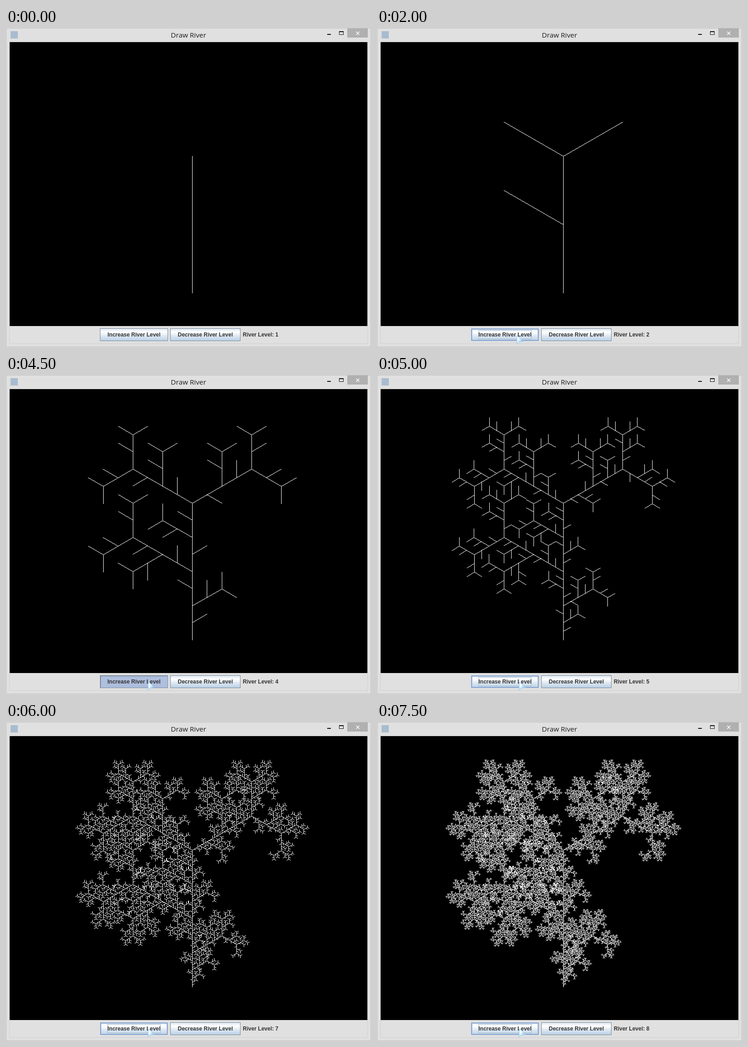
An HTML page with a canvas for the animation above (8000 ms loop, 800 px wide and 700 px high).

```html
<!DOCTYPE html>
<html lang="en">
<head>
<meta charset="utf-8">
<title>Draw River</title>
<style>
  html, body { margin: 0; width: 100%; height: 100%; overflow: hidden; background: #e0e0e0; }
  canvas { position: absolute; left: 8px; top: 31px; background: #000; }
  svg { position: absolute; left: 0; top: 0; }
  .label { font: bold 12px "Liberation Sans", Arial, sans-serif; fill: #333; }
  .title { font: 15.3px "Open Sans", "Noto Sans", sans-serif; fill: #1c1c1c; text-anchor: middle; }
  .line { fill: none; }
</style>
</head>
<body>
<canvas id="view" width="784" height="623"></canvas>
<svg width="800" height="700" viewBox="0 0 800 700">
  <defs>
    <linearGradient id="metal" x2="0" y2="1">
      <stop offset="0" stop-color="#dde8f3"/>
      <stop offset=".3" stop-color="#fff"/>
      <stop offset=".6" stop-color="#dde8f3"/>
      <stop offset="1" stop-color="#b8cfe5"/>
    </linearGradient>
    <linearGradient id="glass" x2="1" y2="1">
      <stop offset=".3" stop-color="#fff"/>
      <stop offset="1" stop-color="#58aee8"/>
    </linearGradient>
  </defs>

  <!-- window frame -->
  <g shape-rendering="crispEdges">
    <rect class="line" x=".5" y=".5" width="799" height="699" stroke="#c4c4c4"/>
    <rect class="line" x="7.5" y="30.5" width="785" height="662" stroke="#d0d0d0"/>
    <rect x="10" y="7" width="16" height="16" fill="#a9bccf"/>
    <rect x="704" y="13" width="8" height="2" fill="#111"/>
    <path d="M730 7h10v8h-10zM731 9v5h8v-5z" fill="#111" fill-rule="evenodd"/>
    <rect x="748" y="1" width="45" height="20" fill="#b0b0b0"/>
  </g>
  <path d="M767.5 8l7 7m0-7l-7 7" stroke="#fff" stroke-width="1.4"/>
  <text class="title" x="400" y="21">Draw River</text>

  <!-- buttons -->
  <g shape-rendering="crispEdges">
    <rect id="face" x="206" y="659" width="149" height="28"/>
    <rect id="outer" class="line" x="206.5" y="659.5" width="148" height="27"/>
    <rect id="inner" class="line" x="207.5" y="660.5" width="146" height="25" stroke="#6382bf"/>
    <rect id="inset" class="line" x="208.5" y="661.5" width="144" height="23" stroke="#b8cfe5"/>
    <path id="sunken" class="line" d="M207.5 686V660.5H354" stroke="#7a8a99"/>
    <rect id="focus" class="line" x="222.5" y="663.5" width="116" height="19" stroke="#a3b8cc"/>
    <rect x="360.5" y="659.5" width="153" height="27" fill="url(#metal)" stroke="#7a8a99"/>
  </g>
  <text class="label" x="222.5" y="677">Increase River Level</text>
  <text class="label" x="376.5" y="677">Decrease River Level</text>
  <text class="label" x="519" y="677" id="level"></text>

  <path id="cursor" d="M3 1.5L16.5 13.5L9 14.5L2.5 19.5Z" fill="url(#glass)" stroke="#8fcaf2" stroke-linejoin="round"/>
</svg>
<script>
const $ = id => document.getElementById(id);
const MAX = 8, LOOP = 8000, LEFT = 1, RIGHT = -1;
const IDLE = 0, HOVER = 1, DOWN = 2;

// time, river level, button state, cursor x, cursor y
const steps = [
  [0, 1, IDLE],
  [500, 1, IDLE, 597, 604],
  [1000, 1, HOVER, 296, 677],
  [1500, 2, HOVER, 300, 674],
  [2000, 2, HOVER, 304, 674],
  [2500, 3, HOVER, 304, 674],
  [3000, 4, HOVER, 304, 674],
  [4000, 4, HOVER, 304, 672],
  [4500, 4, DOWN, 309, 672],
  [5000, 5, HOVER, 309, 672],
  [5500, 6, HOVER, 309, 672],
  [6000, 7, HOVER, 309, 672],
  [7000, 7, DOWN, 309, 672],
  [7500, 8, HOVER, 309, 672]
];

const view = $("view"), ctx = view.getContext("2d");
const layers = Array.from({ length: MAX }, () => {
  const c = document.createElement("canvas");
  c.width = view.width;
  c.height = view.height;
  const g = c.getContext("2d");
  g.fillStyle = "#fff";
  return g;
});

// Hard-edged one pixel line
function drawLine(g, x, y, vx, vy) {
  const dx = Math.abs(vx), dy = Math.abs(vy), sx = Math.sign(vx), sy = Math.sign(vy);
  const endX = x + vx, endY = y + vy;
  if (!dx || !dy) {
    g.fillRect(Math.min(x, endX), Math.min(y, endY), dx + 1, dy + 1);
    return;
  }
  let err = dx - dy;
  for (;;) {
    g.fillRect(x, y, 1, 1);
    if (x === endX && y === endY) return;
    const e = 2 * err;
    if (e > -dy) { err -= dy; x += sx; }
    if (e < dx) { err += dx; y += sy; }
  }
}

// A whole river forks at its end; every stretch gets a tributary at its middle.
function river(x, y, vx, vy, depth, side, whole) {
  if (whole) drawLine(layers[depth], x, y, vx, vy);
  if (++depth === MAX) return;
  const hx = Math.floor(vx / 2), hy = Math.floor(vy / 2);
  const branch = (bx, by, turn, next) => {
    const s = turn * Math.sqrt(3) / 2;
    river(bx, by, Math.round((vx / 2 + vy * s) / 2), Math.round((vy / 2 - vx * s) / 2), depth, next, true);
  };
  branch(x + hx, y + hy, side, LEFT);
  if (whole) {
    branch(x + vx, y + vy, LEFT, RIGHT);
    branch(x + vx, y + vy, RIGHT, LEFT);
  }
  river(x, y, hx, hy, depth, RIGHT, false);
  river(x + hx, y + hy, vx - hx, vy - hy, depth, LEFT, false);
}
river(400, 550, 0, -300, 0, LEFT, true);

const show = (id, on) => $(id).setAttribute("visibility", on ? "visible" : "hidden");

function render([time, level, state, x, y]) {
  ctx.clearRect(0, 0, view.width, view.height);
  layers.slice(0, level).forEach(g => ctx.drawImage(g.canvas, 0, 0));
  $("level").textContent = "River Level: " + level;
  $("face").setAttribute("fill", state === DOWN ? "#afbfdf" : "url(#metal)");
  $("outer").setAttribute("stroke", state === HOVER ? "#b8cfe5" : "#7a8a99");
  show("inner", state === HOVER);
  show("inset", state === HOVER);
  show("sunken", state === DOWN);
  show("focus", level > 1);
  show("cursor", x !== undefined);
  if (x !== undefined) $("cursor").setAttribute("transform", `translate(${x} ${y})`);
}

let current;
function tick(now) {
  const t = now % LOOP;
  const step = steps.findLast(s => s[0] <= t);
  if (step !== current) render(current = step);
  requestAnimationFrame(tick);
}
tick(0);
</script>
</body>
</html>
```
